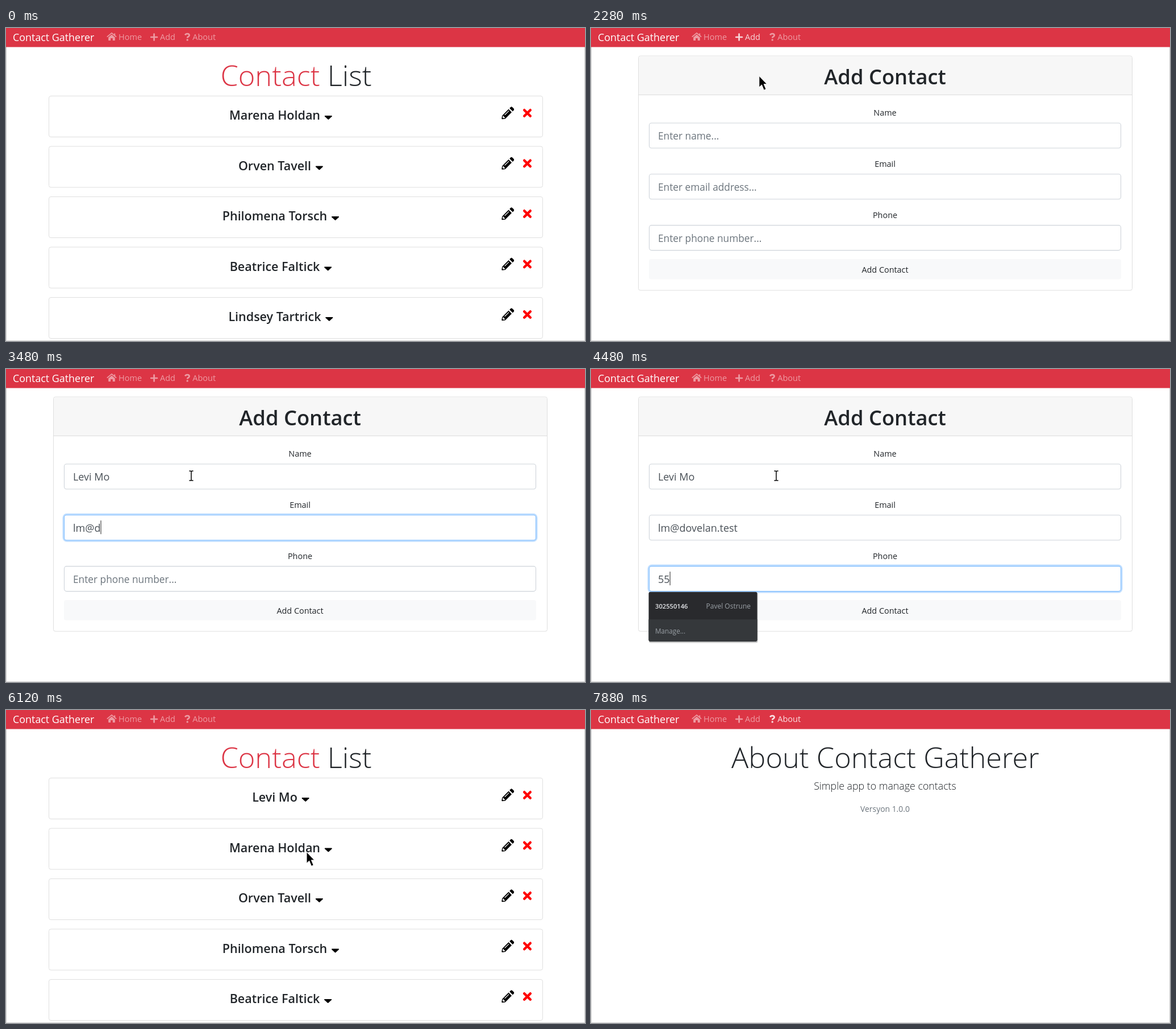
Animation of 1019x550 px, one loop 8 s. Source, as an HTML page:

```html
<!DOCTYPE html>
<html lang="en">
<head>
<meta charset="utf-8">
<title>Contacts</title>
<style>
  html, body { margin: 0; width: 100%; height: 100%; overflow: hidden; background: #fff; }
  svg { display: block; width: 100vw; height: 100vh; }
  text { font-family: "Open Sans", "Noto Sans", sans-serif; font-size: 14.4px; fill: #212529; white-space: pre; }
  .mid { text-anchor: middle; }
  .semi { font-weight: 600; }
  .light { font-weight: 300; }
  .display { font-size: 50.5px; }
  .line { fill: #fff; stroke: #dfdfdf; }
  .link text { fill: #fff; font-size: 14.5px; }
  .input { font-size: 18px; fill: #495057; }
  .empty { font-size: 17.3px; fill: #6c757d; }
</style>
</head>
<body>
<svg id="stage" viewBox="0 0 1019 550" xmlns="http://www.w3.org/2000/svg"></svg>
<script>
const LOOP = 8000;
const stage = document.getElementById('stage');
const person = { name: 'Levi Mo', email: 'lm@dovelan.test', phone: '555-010-042' };
const others = ['Marena Holdan', 'Orven Tavell', 'Philomena Torsch', 'Beatrice Faltick', 'Lindsey Tartrick'];
const app = 'Contact Gatherer';

// Moments at which the interface changes
const T = {
  addHover: 1960, form: 2120, nameFocus: 2480, nameKeys: 2600, emailFocus: 3160, emailKeys: 3320,
  phoneFocus: 4040, phoneKeys: 4480, saved: 5840, expand: 6320, remove: 7160, aboutHover: 7440, about: 7560
};

const text = (x, y, str, cls = '', extra = '') => `<text x="${x}" y="${y}" class="${cls}" ${extra}>${str}</text>`;
const box = (x, y, w, h, r, attrs) => `<rect x="${x}" y="${y}" width="${w}" height="${h}" rx="${r}" ${attrs}/>`;
const group = (id, inner, cls = '') => `<g id="${id}" class="${cls}">${inner}</g>`;

const pencil = `<g transform="translate(872.3 19.3)">
  <path d="M12.2 4.3L.9 15.6 0 20.8Q0 22 1.2 22L6.4 21.1 17.7 9.8Z
    M13.9 2.6L15.8 .7Q17.3 -.5 18.7 .6L21.3 3.2Q22.5 4.7 21.4 6.1L19.4 8.1Z"/>
  <path d="M5.7 14.2L12.4 7.5" stroke="#fff" stroke-width="1.1" stroke-linecap="round"/>
  <path d="M2.2 16.2H3.8V18.2H5.8V19.8L3 20.3 1.7 19Z" fill="#fff"/></g>`;
const cross = `<path d="M912.2 25.2L922.8 35.8M922.8 25.2L912.2 35.8" stroke="#f00" stroke-width="4.4" stroke-linecap="round"/>`;
const triangle = `<path class="tri" d="M1 35H12.5Q14 35.2 13 36.4L7.6 41.6Q6.8 42.3 6 41.6L.5 36.4Q-.4 35.2 1 35Z"/>`;

function row(id, name, height, inner = '') {
  return group(id, box(75.5, .5, 869, height, 3.5, 'class="line"') +
    text(0, 42, name, 'semi name', 'style="font-size:21.5px"') + triangle + pencil + cross + inner);
}

const details = group('details',
  box(75.5, .5, 869, 165, 3.5, 'class="line"') +
  box(95.5, 54.5, 829.5, 91, 3.5, 'class="line"') +
  '<path d="M95.5 99.9H925" stroke="#dfdfdf"/>' +
  text(509.7, 83, 'Email: ' + person.email, 'mid') +
  text(509.7, 129, 'Phone: ' + person.phone, 'mid'));

const list = group('list',
  text(510.5, 102, '<tspan fill="#dc3545">Contact</tspan> List', 'display light mid') +
  details.replace('id="details"', 'id="details" transform="translate(0 119)"') +
  row('own', person.name, 72) +
  others.map((name, i) => row('row' + i, name, 72)).join(''));

function field(id, y, label, hint) {
  return text(517.5, y - 13, label, 'mid') +
    box(101, y - 1.5, 833, 47, 6, `id="${id}Ring" fill="none" stroke="#bfdeff" stroke-width="3"`) +
    box(102.5, y, 830, 44, 4, `id="${id}Box" fill="#fff" stroke="#ced4da" stroke-width="1.1"`) +
    text(118, y + 29, hint, 'empty', `id="${id}Hint"`) +
    text(118, y + 29, '', 'input', `id="${id}Text"`) +
    box(0, y + 9.5, 1, 24, 0, `id="${id}Caret" fill="#222"`);
}

const popup = (y, w, h) => box(102, y + 1, w + .5, h + 1.5, 3, 'fill="#000" opacity=".22"') +
  box(101.5, y, w, h, 3, 'fill="#292a2d"');

const form = group('form',
  box(83.5, 49, 869, 412, 3.5, 'class="line"') +
  '<path d="M84 117.5V52.5Q84 49.5 87 49.5H949Q952 49.5 952 52.5V117.5Z" fill="#f7f7f7"/>' +
  '<path d="M83.5 117.5H952.5" stroke="#dcdcdc"/>' +
  text(517.5, 99, 'Add Contact', 'semi mid', 'style="font-size:36.3px"') +
  field('name', 167, 'Name', 'Enter name...') +
  field('email', 256.7, 'Email', 'Enter email address...') +
  field('phone', 346.6, 'Phone', 'Enter phone number...') +
  box(102.5, 406.5, 830, 34.5, 3, 'id="button"') +
  text(517.5, 430, 'Add Contact', 'mid') +
  group('namePopup', popup(212, 180.5, 48.5) +
    text(113, 241, person.name, 'semi', 'style="font-size:11.8px;fill:#e8eaed"')) +
  group('phonePopup', popup(391.7, 191, 87) +
    '<path d="M101.5 440H292.5V475.7Q292.5 478.7 289.5 478.7H104.5Q101.5 478.7 101.5 475.7Z" fill="#35383b"/>' +
    text(113, 421, '302550146', 'semi', 'style="font-size:11.2px;fill:#e8eaed"') +
    text(281, 421, 'Pavel Ostrune', '', 'style="font-size:12px;fill:#9aa0a6;text-anchor:end"') +
    text(113, 465, 'Manage...', '', 'style="font-size:11.7px;fill:#9aa0a6"')));

const about = group('about',
  text(518, 102, 'About ' + app, 'display light mid') +
  text(517.5, 140, 'Simple app to manage contacts', 'light mid', 'style="font-size:17.8px"') +
  text(517.5, 179, 'Versyon 1.0.0', 'mid', 'style="font-size:13.9px;fill:#6c757d"'));

const nav = '<path d="M0 0H1019V33.6H0Z" fill="#dc3545"/>' +
  text(12, 22.5, app, '', 'style="font-size:17.9px;fill:#fff"') +
  group('linkHome', `<path d="M177.8 15.6L186 8.8 194.2 15.6" fill="none" stroke="#fff" stroke-width="1.7"/>
    <path d="M190.2 9.4H192.2V13.6L190.2 12ZM180.2 16.4L186 11.6 191.8 16.4V22H187.8V18H184.2V22H180.2Z" fill="#fff"/>` +
    text(198, 21.3, 'Home'), 'link') +
  group('linkAdd', '<path d="M255.2 16H266M260.6 10.6V21.4" stroke="#fff" stroke-width="2.7" stroke-linecap="round"/>' +
    text(271, 21.3, 'Add'), 'link') +
  group('linkAbout', `<path d="M315.2 12.4Q316.4 10 319.2 10 322.6 10.2 322.6 12.8 322.4 14.6 320.4 15.5 319.2 16.2 319.2 17.6"
      fill="none" stroke="#fff" stroke-width="2.7"/><circle cx="319.2" cy="20.9" r="1.7" fill="#fff"/>` +
    text(328.3, 21.3, 'About'), 'link');

const pointers =
  group('arrow', `<path d="M0 0V19.6L4.6 15.4 8.4 24.6 12 23 8.2 14.2H13.6Z" fill="#000" stroke="#fff" stroke-width=".8"/>`) +
  group('beam', `<path d="M-3.6 -8.2H-1.4Q0 -8.2 0 -6.8 0 -8.2 1.4 -8.2H3.6M0 -7V7.4M-3.6 8.6H-1.4Q0 8.6 0 7.2 0 8.6 1.4 8.6H3.6"
    fill="none" stroke="#000" stroke-width="1.5"/>`) +
  group('hand', `<path d="M-1.5 1Q-1.4 -.4 0 -.4 1.4 -.4 1.5 1V6.2Q3 5.4 4 6.8 5.5 6.2 6.3 7.6 8.6 7.2 8.7 9.4V13Q8.6 15.4 7.4 17.2V19.5H-1V17.6L-5.6 11.6Q-6.3 10 -4.8 9.3 -3.6 9 -2.6 10.2L-1.5 11.4Z"
    fill="#fff" stroke="#111" stroke-linejoin="round"/>
    <path d="M1.5 6.2V9.6M4 6.8V9.8M6.3 7.6V10" stroke="#111" stroke-width=".9"/>`);

stage.innerHTML = '<path d="M0 0H1019V550H0Z" fill="#fff"/>' + list + form + about +
  '<path d="M.5 33V549.5H1018.5V33" fill="none" stroke="#cfcfcf"/>' + nav + group('pointer', pointers);

const el = id => document.getElementById(id);
const show = (id, on) => el(id).setAttribute('display', on ? 'inline' : 'none');
const move = (node, x, y) => node.setAttribute('transform', `translate(${x} ${y})`);

// Centre each name together with its triangle
for (const label of document.querySelectorAll('.name')) {
  const width = label.getComputedTextLength();
  const left = 483.5 - (width + 21) / 2;
  label.setAttribute('x', left);
  move(label.nextElementSibling, left + width + 7.5, 0);
}

// Pointer stops: time, x, y
const path = [
  [500, 700, 562], [1000, 926, 385], [1240, 900, 330], [1640, 900, 330], [2000, 276, 16], [2160, 276, 16],
  [2440, 326, 187.5], [5480, 326, 187.5], [5660, 533, 426.5], [5880, 533, 426.5], [6280, 527, 155],
  [6720, 527, 155], [7000, 919.5, 144.5], [7180, 919.5, 144.5], [7480, 345, 15], [7640, 345, 15], [7840, 420, 570]
];

function pointerAt(t) {
  const i = path.findIndex(p => p[0] > t);
  if (i < 1) return [0, -50];
  const [t0, x0, y0] = path[i - 1], [t1, x1, y1] = path[i];
  const k = (t - t0) / (t1 - t0), e = k * k * (3 - 2 * k);
  return [x0 + (x1 - x0) * e, y0 + (y1 - y0) * e];
}

function pointerKind(page, x, y) {
  const inside = (l, top, r, b) => x >= l && x <= r && y >= top && y <= b;
  if (inside(178, 5, 369, 28)) return 'hand';
  if (page === 'form') {
    if (inside(102, 406, 933, 441)) return 'hand';
    if ([167, 257, 347].some(top => inside(102, top, 933, top + 44))) return 'beam';
  }
  if (page === 'list' && (inside(519, 150, 535, 163) || inside(909, 141, 926, 158))) return 'hand';
  return 'arrow';
}

const typed = (str, t, start, step, first = 1) =>
  t < start ? '' : str.slice(0, first + Math.floor((t - start) / step));

function setField(id, value, focused, caret) {
  el(id + 'Text').textContent = value;
  show(id + 'Hint', !value);
  show(id + 'Ring', focused);
  el(id + 'Box').setAttribute('stroke', focused ? '#80bdff' : '#ced4da');
  show(id + 'Caret', focused && caret);
  el(id + 'Caret').setAttribute('x', 118 + (value ? el(id + 'Text').getComputedTextLength() : 0));
}

function render(t) {
  const within = (a, b) => t >= a && t < b;
  const page = within(T.form, T.saved) ? 'form' : t >= T.about ? 'about' : 'list';
  for (const id of ['list', 'form', 'about']) show(id, id === page);

  const added = within(T.saved, T.remove), open = within(T.expand, T.remove);
  show('own', added);
  show('details', open);
  move(el('own'), 0, 119);
  el('own').firstChild.setAttribute('display', open ? 'none' : 'inline');
  others.forEach((_, i) => move(el('row' + i), 0, 119 + 88.5 * i + (open ? 181.5 : added ? 88.5 : 0)));

  if (page === 'form') {
    setField('name', typed(person.name, t, T.nameKeys, 90), within(T.nameFocus, T.emailFocus), true);
    setField('email', typed(person.email, t, T.emailKeys, 45), within(T.emailFocus, T.phoneFocus), true);
    setField('phone', typed(person.phone, t, T.phoneKeys, 93, 2), t >= T.phoneFocus, !within(4160, 4320));
  }
  show('namePopup', within(T.nameKeys, T.emailFocus));
  show('phonePopup', within(T.phoneKeys, T.phoneKeys + 93));

  el('linkHome').setAttribute('opacity', .5);
  el('linkAdd').setAttribute('opacity', within(T.addHover, T.nameFocus) ? .8 : .5);
  el('linkAbout').setAttribute('opacity', t >= T.aboutHover ? .85 : .5);

  const [x, y] = pointerAt(t), kind = pointerKind(page, x, y);
  move(el('pointer'), x, y);
  for (const id of ['arrow', 'beam', 'hand']) show(id, id === kind);
  const hover = page === 'form' && kind === 'hand' && y > 400;
  el('button').setAttribute('fill', hover ? '#e2e6ea' : '#f8f9fa');
  el('button').setAttribute('stroke', hover ? '#dae0e5' : '#f8f9fa');
}

const begin = performance.now();
function tick() {
  render((performance.now() - begin) % LOOP);
  requestAnimationFrame(tick);
}
tick();
</script>
</body>
</html>
```
